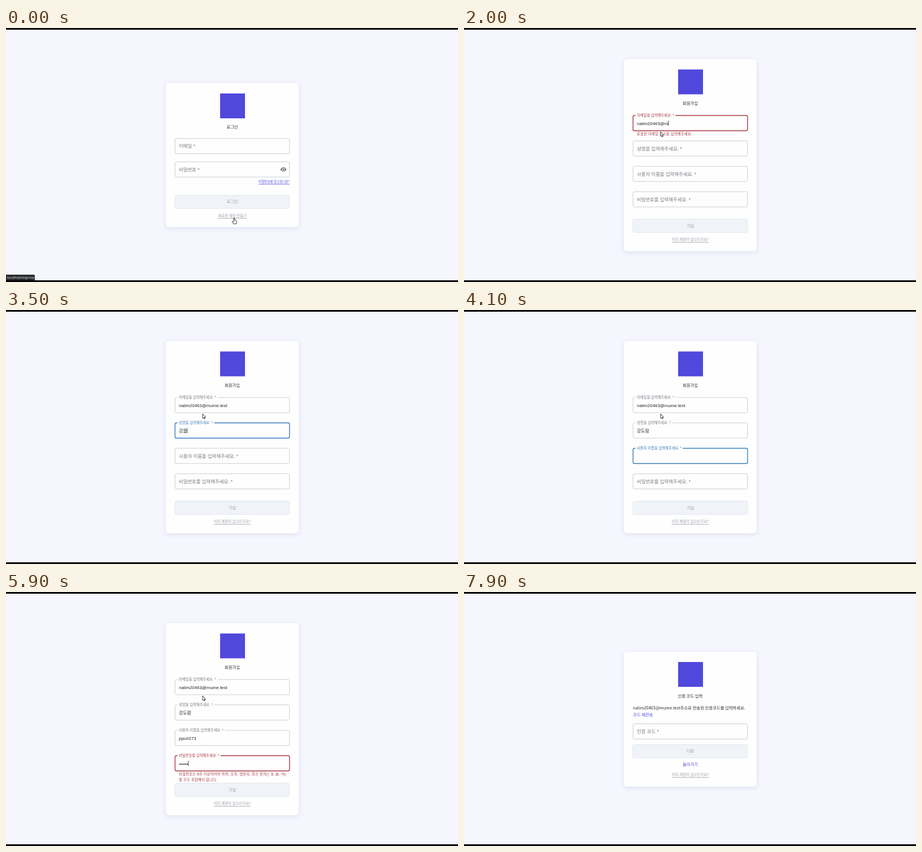
Animation of 800 by 450 pixels, one loop 8000 ms. Source, as an HTML page with a canvas:

```html
<!DOCTYPE html>
<html lang="ko">
<meta charset="utf-8">
<title>회원가입</title>
<style>
  html, body { margin: 0; width: 100%; height: 100%; overflow: hidden; background: #f5f6fe; }
  canvas { display: block; }
</style>
<canvas width="800" height="450"></canvas>
<script>
const ctx = document.querySelector('canvas').getContext('2d');
const LOOP = 8000, BLINK = 220, FLOAT = 110;
const SANS = '"Noto Sans CJK KR", "Noto Sans CJK JP", "Noto Sans", sans-serif';
const INPUT = '"Liberation Sans", "Noto Sans CJK KR", "Noto Sans CJK JP", sans-serif';
const PURPLE = '#5148dc', BLUE = '#3b7fb8', RED = '#a93a46', GREY = '#777a80', PALE = '#9a9da5', INK = '#25262b';
const EMAIL = 'nalim20463@mume.test';
const NAME_STEPS = ['', 'ㄱ', '가', '강', '강ㄷ', '강도', '강돌', '강도라', '강도람'];
const HINTS = ['rty27@norim.test', 'plmokn27', '단솔', 'rtyu48@norim.test', '강도람', 'rty4'];
const T = { signup: 300, popup: 750, typing: 1050, valid: 6110, code: 7120, gone: 7680 };

const clamp = (v, lo, hi) => Math.max(lo, Math.min(hi, v));
const mix = (a, b, p) => a + (b - a) * p;
const ease = p => p * p * (3 - 2 * p);
const progress = (t, start, span) => ease(clamp((t - start) / span, 0, 1));
const keys = (t, start, step, max) => t < start ? 0 : Math.min(max, Math.floor((t - start) / step) + 1);

function text(str, x, y, size, color, { align = 'left', font = SANS, weight = 400, spacing = 0 } = {}) {
  ctx.font = `${weight} ${size}px ${font}`;
  ctx.letterSpacing = spacing + 'px';
  ctx.textAlign = align;
  ctx.fillStyle = color;
  ctx.fillText(str, x, y + size * 0.36);
  return ctx.measureText(str).width;
}

function box(x, y, w, h, r, fill, stroke, line = 1) {
  ctx.beginPath();
  ctx.roundRect(x, y, w, h, r);
  if (fill) { ctx.fillStyle = fill; ctx.fill(); }
  if (stroke) { ctx.strokeStyle = stroke; ctx.lineWidth = line; ctx.stroke(); }
}

function card(top, bottom, logoY, title, titleY) {
  ctx.save();
  ctx.shadowColor = 'rgba(70, 75, 120, .13)';
  ctx.shadowBlur = 9;
  ctx.shadowOffsetY = 2;
  box(283, top, 235, bottom - top, 6, '#fefeff');
  ctx.restore();
  box(379, logoY, 44, 44, 0, PURPLE);
  text(title, 400.5, titleY, 7.3, INK, { align: 'center' });
}

function button(label, y, enabled) {
  box(299, y, 203, 23.5, 3, enabled ? PURPLE : '#f0f3f8', enabled ? PURPLE : '#e2e6ed');
  text(label, 400.5, y + 11.5, 7.2, enabled ? '#fff' : PALE, { align: 'center' });
}

function link(label, y, size = 6.5, x = 400.5, align = 'center', color = PALE) {
  const w = text(label, x, y, size, color, { align });
  ctx.fillStyle = color;
  ctx.fillRect(align === 'center' ? x - w / 2 : x - w, y + 4.3, w, 0.8);
}

function field(y, label, { value = '', float = 0, focused = false, error = false, caret = false } = {}) {
  const accent = error ? RED : focused ? BLUE : null;
  box(299.2, y, 202.6, 27, 2.5, '#fefeff', accent || '#c6c7cf', accent ? 1.4 : 0.9);
  const size = mix(8.4, 6.3, float);
  if (float) {
    ctx.font = `${size}px ${INPUT}`;
    ctx.letterSpacing = '0px';
    ctx.fillStyle = '#fefeff';
    ctx.fillRect(303.5, y - 1.5, (ctx.measureText(label).width + 5) * float, 3);
  }
  text(label, 306, mix(y + 13.5, y, float), size, accent || GREY, { font: INPUT });
  const w = value ? text(value, 306, y + 13.7, 7.9, INK, { font: INPUT }) : 0;
  if (caret) {
    ctx.fillStyle = INK;
    ctx.fillRect(305.7 + w, y + 9, 0.8, 9);
  }
}

function eye(x, y) {
  ctx.fillStyle = '#6b6c70';
  ctx.beginPath();
  ctx.moveTo(x - 5.5, y);
  ctx.quadraticCurveTo(x, y - 7.6, x + 5.5, y);
  ctx.quadraticCurveTo(x, y + 7.6, x - 5.5, y);
  ctx.fill();
  for (const [r, color] of [[2.6, '#fefeff'], [1.6, '#6b6c70']]) {
    ctx.fillStyle = color;
    ctx.beginPath();
    ctx.arc(x, y, r, 0, 7);
    ctx.fill();
  }
}

function pointer(x, y, shape) {
  ctx.save();
  ctx.translate(x, y);
  const path = new Path2D(shape);
  ctx.lineJoin = 'round';
  ctx.lineWidth = 0.9;
  ctx.fillStyle = '#fff';
  ctx.strokeStyle = '#222';
  ctx.fill(path);
  ctx.stroke(path);
  ctx.restore();
}
const ARROW = 'M0 0V8L1.8 6.4 3 9 4.3 8.4 3.1 5.9H5.4Z';
const HAND = 'M-1 0Q0-1.2 .8 0V3.4L3 3.8Q4.3 4.2 4.2 5.5L3.5 10H-1.2L-3.6 6.6Q-3.8 5.2-2.6 5.4L-1 6.5Z';

// Stops of the mouse path: time, x, y
const MOUSE = [[0, 404, 337], [300, 404, 337], [560, 348, 184], [6350, 348, 184], [6800, 415, 345],
  [7040, 415, 345], [7200, 419, 294], [7620, 206, 6]];

function mouse(t) {
  if (t >= T.gone) return;
  const i = MOUSE.findLastIndex(stop => stop[0] <= t);
  const [t0, x0, y0] = MOUSE[i], [t1, x1, y1] = MOUSE[i + 1] || [t0 + 1, x0, y0];
  const p = progress(t, t0, t1 - t0);
  const x = mix(x0, x1, p), y = mix(y0, y1, p);
  const overButton = t < T.code && t > T.signup && x > 299 && x < 502 && y > 338 && t > T.valid;
  pointer(x, y, t < T.signup || overButton ? HAND : ARROW);
}

function login() {
  card(97, 353, 116, '로그인', 175.5);
  field(195.8, '이메일 *');
  field(237, '비밀번호 *');
  eye(491, 250.5);
  link('비밀번호를 잊으셨나요?', 272, 5.55, 502, 'right', PURPLE);
  button('로그인', 296.3);
  link('새로운 계정 만들기', 332.5);
  box(-3, 437, 54, 14, 2, '#2b2c30');
  text('localhost/sign/up', 2, 442, 5.9, '#e4e5e8', { font: '"Noto Sans", sans-serif' });
}

function signup(t) {
  card(55, 395.5, 73.5, '회원가입', 133);
  const typed = t < 2000 ? keys(t, T.typing, 80, 12) : Math.min(20, 12 + Math.floor((t - 2000) / 108));
  const secret = keys(t, 5350, 95, 9);
  const emailError = typed > 0 && typed < 19, secretError = secret > 0 && secret < 9;
  const fields = [
    ['이메일을 입력해주세요. *', 560, 2880, EMAIL.slice(0, typed), emailError],
    ['성명을 입력해주세요. *', 2880, 3800, NAME_STEPS[keys(t, 3020, 90, 8)]],
    ['사용자 이름을 입력해주세요. *', 3800, 5250, 'ppuri273'.slice(0, keys(t, 4200, 110, 8))],
    ['비밀번호를 입력해주세요. *', 5250, 7040, '•'.repeat(secret), secretError],
  ];
  fields.forEach(([label, start, end, value, error], i) => {
    const focused = t >= start && t < end;
    field(155 + i * 45, label, {
      value, error, focused,
      float: progress(t, start, FLOAT),
      caret: focused && Math.floor((t - start) / BLINK) % 2 === 0,
    });
  });
  const note = (str, y) => text(str, 306, y, 6.3, RED, { font: INPUT, spacing: 0.2 });
  if (emailError) note('유효한 이메일 주소를 입력해주세요.', 188);
  if (secretError) {
    note('비밀번호는 8자 이상이어야 하며, 숫자, 영문자, 특수 문자(!, $, @, %)', 323);
    note('를 모두 포함해야 합니다.', 332.5);
  }
  button('가입', 338.7, t >= T.valid);
  link('이미 계정이 있으신가요?', 375);
}

function popup() {
  ctx.fillStyle = '#202124';
  ctx.beginPath();
  ctx.moveTo(352, 188);
  ctx.lineTo(357, 183);
  ctx.lineTo(362, 188);
  ctx.fill();
  box(347.3, 187, 87.7, 109.3, 3, '#202124');
  HINTS.forEach((hint, i) => text(hint, 353, 198 + i * 17.55, 6.6, '#f0f0f2', { font: '"Noto Sans", ' + SANS }));
}

function code() {
  card(106, 345, 124, '인증 코드 입력', 184);
  text(EMAIL + '주소로 전송된 인증코드를 입력하세요.', 299, 205.5, 7.35, INK);
  text('코드 재전송', 299, 217, 7.35, PURPLE);
  field(233.5, '인증 코드 *');
  button('다음', 270.3);
  text('돌아가기', 400.5, 305, 7.3, PURPLE, { align: 'center', weight: 500 });
  link('이미 계정이 있으신가요?', 324);
}

function draw(t) {
  ctx.fillStyle = '#f5f6fe';
  ctx.fillRect(0, 0, 800, 450);
  if (t < T.signup) login();
  else if (t < T.code) signup(t);
  else code();
  mouse(t);
  if (t >= T.popup && t < T.typing) popup();
  ctx.fillStyle = '#000';
  ctx.fillRect(0, 0, 800, 3);
  ctx.fillRect(0, 447, 800, 3);
}

const begin = performance.now();
function tick() {
  draw((performance.now() - begin) % LOOP);
  requestAnimationFrame(tick);
}
tick();
</script>
</html>
```
